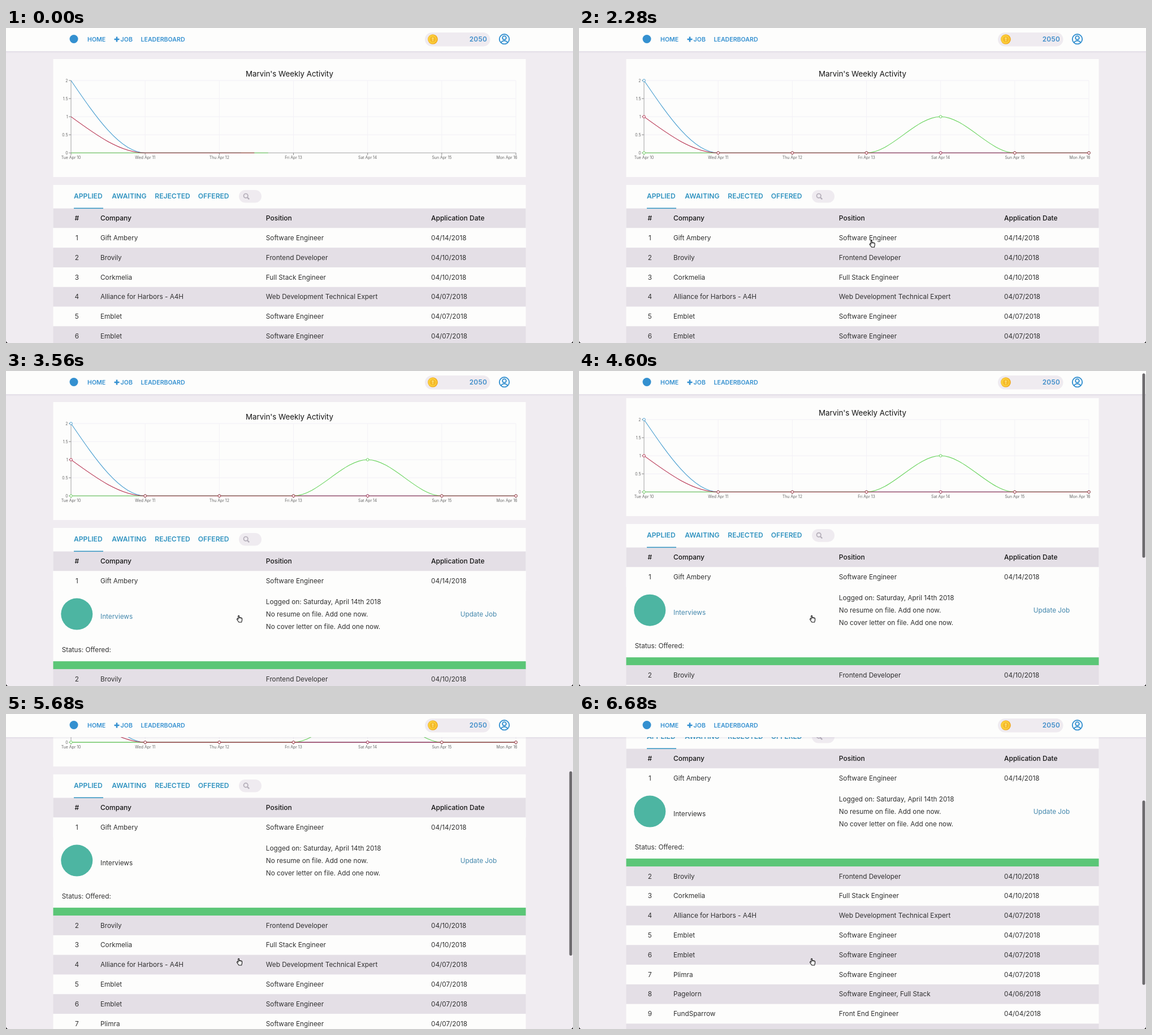
Recreate the animation shown at these times as an HTML page. Size 1003 px wide and 558 px high, loop 6720 ms.

```html
<!DOCTYPE html>
<html lang="en">
<head>
<meta charset="utf-8">
<title>Job tracker</title>
<style>
  html, body { margin: 0; width: 100%; height: 100%; overflow: hidden; background: #f0ecf1; }
  svg { display: block; width: 100%; height: 100%; }
  text { font-family: Inter, "Open Sans", sans-serif; font-size: 11.75px; fill: #303030; }
  .head { font-size: 12px; font-weight: 500; fill: #151515; }
  .tab { font-size: 12.1px; font-weight: 600; fill: #3093c0; }
  .nav { font-size: 10.6px; font-weight: 600; fill: #3490d0; }
  .tick { font-size: 6.9px; fill: #666; }
  .title { font-size: 13.3px; fill: #151515; }
  .link { fill: #4488ad; }
  .coins { font-size: 11.8px; font-weight: 600; fill: #3f8dc9; letter-spacing: .3px; }
  .mid { text-anchor: middle; }
  .end { text-anchor: end; }
</style>
</head>
<body>
<svg id="stage" viewBox="0 0 1003 558" preserveAspectRatio="none">
  <rect width="1003" height="558" fill="#f0ecf1"/>
  <g id="page">
    <rect x="83.5" y="55" width="836" height="209" fill="#fdfdfc"/>
    <g id="chart"></g>
    <rect x="83.5" y="278" width="836" height="111.3" fill="#fdfdfc"/>
    <g id="tabs"></g>
    <g id="top"></g>
    <g id="detail">
      <rect x="83.5" y="389" width="836" height="125.5" fill="#fdfdfc"/>
      <circle cx="125.3" cy="430.6" r="28" fill="#4db5a2"/>
      <rect x="83.5" y="514.2" width="836" height="14.2" fill="#5bc677"/>
    </g>
    <g id="rest"></g>
  </g>
  <g id="header">
    <defs>
      <linearGradient id="shade" x2="0" y2="1">
        <stop stop-color="#503c78" stop-opacity=".09"/><stop offset="1" stop-color="#503c78" stop-opacity="0"/>
      </linearGradient>
    </defs>
    <rect y="41" width="1003" height="4" fill="url(#shade)"/>
    <rect width="1003" height="41" fill="#fdfdfc"/>
    <circle cx="120" cy="19.5" r="7.5" fill="#3490d0"/>
    <path d="M191.5 20h9M196 15.5v9" stroke="#3490d0" stroke-width="2.6"/>
    <rect x="741" y="8" width="115.5" height="24.5" rx="12.2" fill="#efebf0"/>
    <circle cx="755" cy="20" r="8.8" fill="#f0a921"/>
    <circle cx="754.4" cy="19.8" r="7.6" fill="#fbd03a"/>
    <circle cx="755" cy="20" r="5.2" fill="#f5b92a"/>
    <path d="M755 16.5v7M753.4 18.4h3.2" stroke="#fbe27a" stroke-width="1.4"/>
    <g fill="none" stroke="#3490d0" stroke-width="1.9">
      <circle cx="881.5" cy="19.7" r="8.7"/>
      <circle cx="881.5" cy="17.4" r="3.3"/>
      <path d="M875.8 25.8q1.6-3.2 5.7-3.2t5.7 3.2"/>
    </g>
  </g>
  <rect id="bar" x="996.5" width="5" height="326.5" rx="2.5" fill="#6c6a6d"/>
  <path id="hand" d="M-2.6 1V-4.8a.9.9 0 0 1 1.8 0V-1.4a.85.85 0 0 1 1.7 0a.85.85 0 0 1 1.7.3a.85.85 0 0 1 1.6.4V2.4L3.4 6H-1.4L-4.7 1.3a.95.95 0 0 1 2.1-.9Z"
    fill="#fff" stroke="#111" stroke-width="1.1" stroke-linejoin="round"/>
  <path d="M0 554.5V558H3.5Q.6 557.4 0 554.5ZM1003 554.5V558H999.5Q1002.4 557.4 1003 554.5Z" fill="#111"/>
</svg>
<script>
const LOOP = 6720, OPEN_AT = 2700, SCROLL_AT = 4560;
const LINE_MS = 1500, LINE_LEAD = 385;
const ROW = 34.8, DETAIL = 139;
const $ = id => document.getElementById(id);

function add(parent, tag, attrs, content) {
  const el = document.createElementNS('http://www.w3.org/2000/svg', tag);
  for (const k in attrs) el.setAttribute(k, attrs[k]);
  if (content !== undefined) el.textContent = content;
  parent.appendChild(el);
  return el;
}
// y is the middle of the capitals
const label = (parent, x, y, s, cls = '', drop = 4.2) =>
  add(parent, 'text', { x, y: y + drop, class: cls }, s);

// Chart
const chart = $('chart');
const X0 = 115, DX = 131.17, Y0 = 221.2, UNIT = 64.1;
const px = i => X0 + i * DX, py = v => Y0 - v * UNIT;
const days = ['Tue Apr 10', 'Wed Apr 11', 'Thu Apr 12', 'Fri Apr 13', 'Sat Apr 14', 'Sun Apr 15', 'Mon Apr 16'];
const stroke = (d, color, width = 1) =>
  add(chart, 'path', { d, stroke: color, fill: 'none', 'stroke-width': width });

for (let v = .5; v <= 2; v += .5) stroke(`M${X0} ${py(v)}H902`, '#f1eff6');
days.forEach((d, i) => i && stroke(`M${px(i)} ${py(2)}V${Y0}`, '#f3f1f6'));
stroke(`M${X0} ${py(2)}V${Y0}H902`, '#a3a3a3');
for (let v = 0; v <= 2; v += .5) {
  stroke(`M${X0 - 4} ${py(v)}h4`, '#888');
  label(chart, X0 - 5.5, py(v), v, 'tick end', 2.5);
}
days.forEach((d, i) => {
  stroke(`M${px(i)} ${Y0}v4`, '#888');
  label(chart, i < 6 ? px(i) : 886, 229.3, d, 'tick mid', 2.5);
});
label(chart, 501.5, 81, "Marvin's Weekly Activity", 'title mid', 4.7);

function curve(values) {
  let d = `M${X0} ${py(values[0])}`;
  for (let i = 1; i < values.length; i++) {
    const a = values[i - 1], b = values[i];
    const lead = i === 1 ? (a + b) / 2 : a;
    d += `C${px(i - 1) + DX / 3} ${py(lead)} ${px(i) - DX / 3} ${py(b)} ${px(i)} ${py(b)}`;
  }
  return d;
}
const lines = [], dots = [];
[['#4a9fd0', [2, 0, 0, 0, 0, 0, 0]],
 ['#6bd45f', [0, 0, 0, 0, 1, 0, 0]],
 ['#b5304e', [1, 0, 0, 0, 0, 0, 0]]].forEach(([color, values]) => {
  const line = stroke(curve(values), color, 1.15);
  line.setAttribute('pathLength', 1);
  lines.push(line);
  const group = add(chart, 'g', { fill: '#fff', stroke: color });
  values.forEach((v, i) => add(group, 'circle', { cx: px(i), cy: py(v), r: 2.3 }));
  dots.push(group);
});

// Tabs and search
const tabs = $('tabs');
[['APPLIED', 120], ['AWAITING', 187.3], ['REJECTED', 263.3], ['OFFERED', 339.8]]
  .forEach(([s, x]) => label(tabs, x, 298, s, 'tab', 4.3));
add(tabs, 'rect', { x: 412, y: 287, width: 40, height: 22.6, rx: 11.3, fill: '#efebf0' });
add(tabs, 'path', { d: 'M427 300.2l3.2 3.2', stroke: '#b3adb8', 'stroke-width': 2.2 });
add(tabs, 'circle', { cx: 424.2, cy: 297.2, r: 3.7, fill: 'none', stroke: '#b3adb8', 'stroke-width': 1.7 });

// Table
function row(parent, y, cells, shaded, cls = '') {
  add(parent, 'rect', { x: 83.5, y, width: 836, height: ROW + .1, fill: shaded ? '#e4dfe6' : '#fdfdfc' });
  [125.3, 167, 459.8, 752].forEach((x, i) =>
    label(parent, x, y + 17.3, cells[i], cls + (i ? '' : ' mid')));
}
const HEAD_Y = 319.6;
row($('top'), HEAD_Y, ['#', 'Company', 'Position', 'Application Date'], true, 'head');
add($('top'), 'rect', { x: 120, y: 318.6, width: 52, height: 1.5, fill: '#3093c0' });
[['Gift Ambery', 'Software Engineer', 14],
 ['Brovily', 'Frontend Developer', 10],
 ['Corkmelia', 'Full Stack Engineer', 10],
 ['Alliance for Harbors - A4H', 'Web Development Technical Expert', 7],
 ['Emblet', 'Software Engineer', 7],
 ['Emblet', 'Software Engineer', 7],
 ['Plimra', 'Software Engineer', 7],
 ['Pagelorn', 'Software Engineer, Full Stack', 6],
 ['FundSparrow', 'Front End Engineer', 4],
 ['', '', 0]].forEach(([company, job, day], i) => {
  const date = day ? `04/${String(day).padStart(2, '0')}/2018` : '';
  row($(i ? 'rest' : 'top'), HEAD_Y + ROW * (i + 1), [day ? i + 1 : '', company, job, date], i % 2);
});

// Opened row
const detail = $('detail');
['Logged on: Saturday, April 14th 2018', 'No resume on file. Add one now.', 'No cover letter on file. Add one now.']
  .forEach((s, i) => label(detail, 459.8, 409.2 + i * 21.6, s));
const interviews = label(detail, 167, 435, 'Interviews');
label(detail, 836, 431, 'Update Job', 'link mid');
label(detail, 98.7, 493.4, 'Status: Offered:');

// Header
const header = $('header');
[['HOME', 144], ['JOB', 202.6], ['LEADERBOARD', 238.5]]
  .forEach(([s, x]) => label(header, x, 20, s, 'nav', 3.9));
label(header, 851, 20, '2050', 'coins end');

// Motion
const linear = u => u, smooth = u => u * u * (3 - 2 * u);
function track(keys, t, ease) {
  if (t <= keys[0][0]) return keys[0][1];
  for (let i = 1; i < keys.length; i++) {
    const [t0, a] = keys[i - 1], [t1, b] = keys[i];
    if (t < t1) return a + (b - a) * ease((t - t0) / (t1 - t0));
  }
  return keys[keys.length - 1][1];
}
// CSS "ease": cubic-bezier(.25, .1, .25, 1)
function cssEase(x) {
  if (x >= 1) return 1;
  let lo = 0, hi = 1;
  for (let i = 0; i < 24; i++) {
    const s = (lo + hi) / 2, r = 1 - s;
    if (.75 * s * r * r + .75 * s * s * r + s ** 3 < x) lo = s; else hi = s;
  }
  const r = 1 - lo;
  return .3 * lo * r * r + 3 * lo * lo * r + lo ** 3;
}
const scrollKeys = [[SCROLL_AT, 0], [5080, 88.4], [5680, 171], [6160, 212], [6680, 258], [LOOP, 261]];
const handX = [[1500, 600], [2050, 519], [2750, 519], [3350, 413.3]];
const handY = [[1500, 575], [2050, 382.3], [2750, 382.3], [3350, 439]];

function draw(t) {
  const drawn = cssEase((t + LINE_LEAD) / LINE_MS);
  lines.forEach(l => l.setAttribute('stroke-dasharray', drawn < 1 ? `${drawn} 2` : 'none'));
  dots.forEach(g => g.setAttribute('visibility', drawn < 1 ? 'hidden' : 'visible'));

  const open = t >= OPEN_AT, scroll = track(scrollKeys, t, linear);
  detail.setAttribute('visibility', open ? 'visible' : 'hidden');
  $('rest').setAttribute('transform', `translate(0 ${open ? DETAIL : 0})`);
  $('page').setAttribute('transform', `translate(0 ${-scroll})`);
  $('bar').setAttribute('y', scroll * .594);
  $('bar').setAttribute('visibility', t >= SCROLL_AT ? 'visible' : 'hidden');

  const x = track(handX, t, smooth), y = track(handY, t, smooth);
  $('hand').setAttribute('transform', `translate(${x} ${y})`);
  const over = x > 163 && x < 455 && Math.abs(y + scroll - 435) < 11;
  interviews.setAttribute('class', over ? 'link' : '');
}

const start = performance.now();
function tick() {
  draw((performance.now() - start) % LOOP);
  requestAnimationFrame(tick);
}
tick();
</script>
</body>
</html>
```
